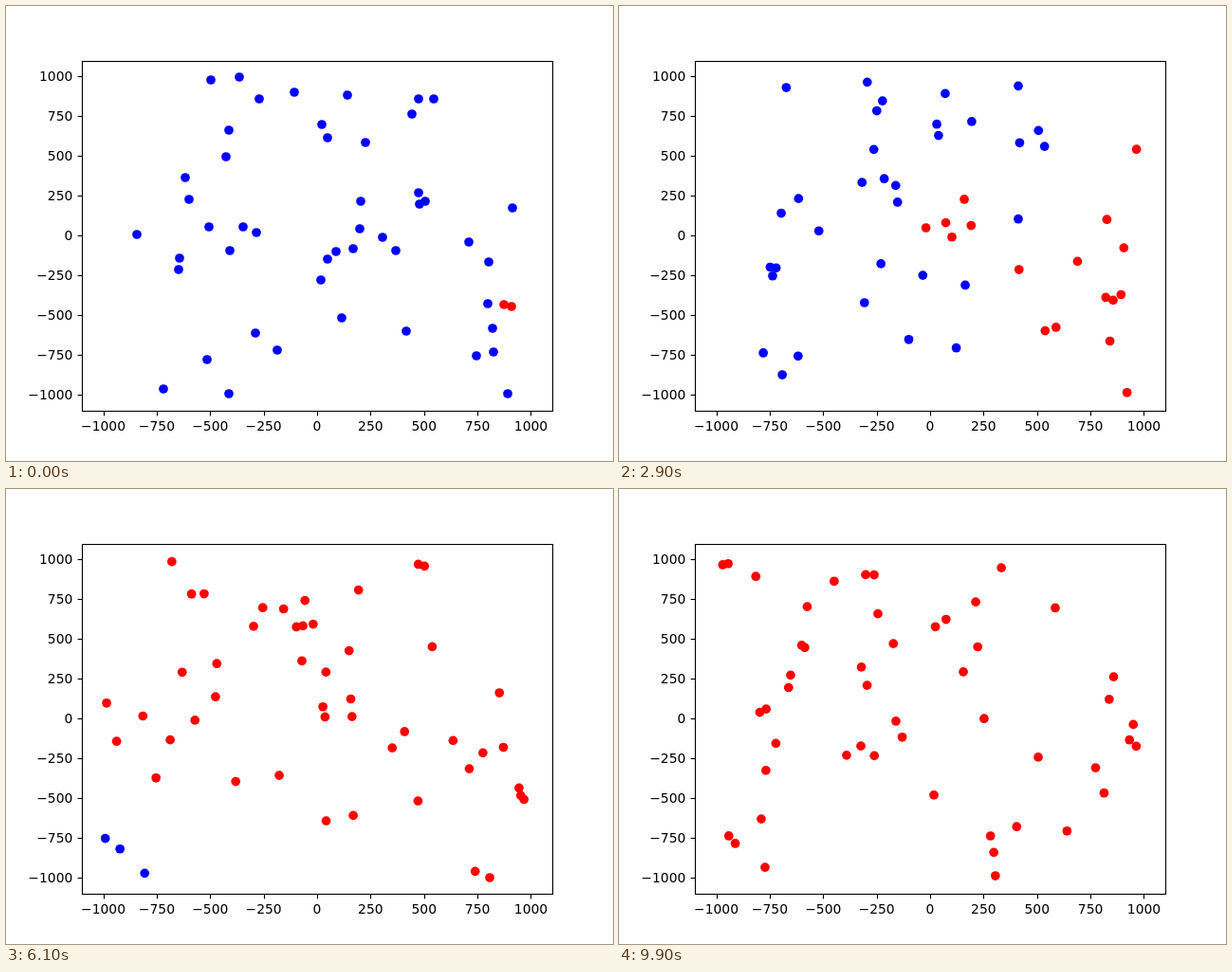
These frames come from a looping animation (640x480 px, 10 s). An HTML page with a canvas:

```html
<!DOCTYPE html>
<html lang="en">
<head>
<meta charset="utf-8">
<title>Spreading dots</title>
<style>
  html, body { margin: 0; width: 100%; height: 100%; overflow: hidden; background: #fff; }
  canvas { display: block; }
</style>
</head>
<body>
<canvas id="plot" width="640" height="480"></canvas>
<script>
const ctx = document.getElementById('plot').getContext('2d');
const STEP = 100, STEPS = 100;
const BOX = { left: 80, right: 576, top: 58, bottom: 427 };
const toX = v => 328 + v * 496 / 2200;
const toY = v => 242.4 - v * 369.6 / 2200;

// Starting places; the last two dots begin red.
const starts = [
  [216, 78], [246, 75], [267, 98], [304, 91], [360, 94], [435, 98], [451, 98],
  [428, 114], [333, 125], [339, 139], [379, 144], [235, 131], [232, 159],
  [189, 181], [193, 204], [138, 241], [214, 233], [250, 233], [264, 239],
  [236, 258], [183, 266], [182, 278], [374, 206], [373, 235], [397, 244],
  [411, 258], [366, 256], [348, 259], [339, 267], [332, 289], [435, 197],
  [436, 209], [442, 206], [534, 213], [488, 249], [509, 270], [508, 314],
  [513, 340], [496, 369], [514, 365], [529, 409], [422, 343], [354, 329],
  [263, 345], [286, 363], [212, 373], [166, 404], [235, 409],
  [525, 315], [533, 317]
];

function makeRandom(seed) {
  return () => {
    seed = (seed * 16807) % 2147483647;
    return seed / 2147483647;
  };
}
const random = makeRandom(290417);
const jitter = size => (random() * 2 - 1) * size;

// Reflects a value back into the range.
function fold(v, lo, hi) {
  if (v < lo) return 2 * lo - v;
  return v > hi ? 2 * hi - v : v;
}

// Random walk; all but the rightmost dots drift slowly up and left.
function makePath([x, y]) {
  const drift = x < 480 ? 0.6 : 0;
  const path = [[x, y]];
  while (path.length < STEPS) {
    x = fold(x + jitter(13) - drift, toX(-1000), toX(1000));
    y = fold(y + jitter(10) - drift / 2, toY(1000), toY(-1000));
    path.push([x, y]);
  }
  return path;
}
const paths = starts.map(makePath);

// Number of red dots: a logistic curve that steepens past its middle.
function redCount(i) {
  const t = i * STEP / 1000 - 3.8;
  const n = Math.round(50.5 / (1 + Math.exp(-t * (t < 0 ? 0.8 : 1.2))));
  return Math.min(starts.length, n);
}

// At each step the blue dots closest to a red one turn red.
function spread() {
  const since = starts.map((s, k) => k >= starts.length - 2 ? 0 : Infinity);
  let reds = 2;
  for (let i = 0; i < STEPS; i++) {
    while (reds < redCount(i)) {
      let best = Infinity, pick = 0;
      paths.forEach((a, p) => {
        if (since[p] <= i) return;
        paths.forEach((b, q) => {
          if (since[q] > i) return;
          const d = Math.hypot(a[i][0] - b[i][0], a[i][1] - b[i][1]);
          if (d < best) { best = d; pick = p; }
        });
      });
      since[pick] = i;
      reds++;
    }
  }
  return since;
}
const redSince = spread();

function line(x1, y1, x2, y2) {
  ctx.beginPath();
  ctx.moveTo(x1, y1);
  ctx.lineTo(x2, y2);
  ctx.stroke();
}

function drawAxes() {
  const { left, right, top, bottom } = BOX;
  ctx.strokeStyle = ctx.fillStyle = '#000';
  ctx.lineWidth = 1.11;
  ctx.font = '13.89px "DejaVu Sans", sans-serif';
  ctx.strokeRect(left + 0.5, top + 0.5, right - left, bottom - top);
  for (let v = -1000; v <= 1000; v += 250) {
    const label = String(v).replace('-', '\u2212');
    const x = Math.round(toX(v)), y = Math.round(toY(v));
    line(x + 0.5, bottom + 0.5, x + 0.5, bottom + 5.4);
    line(left + 0.5, y + 0.5, left - 4.4, y + 0.5);
    ctx.textAlign = 'center';
    ctx.fillText(label, toX(v), 448);
    ctx.textAlign = 'right';
    ctx.fillText(label, 70.3, y + 5);
  }
}

function drawDot([x, y], color) {
  ctx.fillStyle = color;
  ctx.beginPath();
  ctx.arc(x, y, 4.86, 0, Math.PI * 2);
  ctx.fill();
}

function draw(i) {
  ctx.fillStyle = '#fff';
  ctx.fillRect(0, 0, 640, 480);
  paths.forEach((path, k) => drawDot(path[i], redSince[k] <= i ? '#f00' : '#00f'));
  drawAxes();
}

const begin = performance.now();
function tick() {
  const t = Math.max(0, performance.now() - begin);
  draw(Math.floor(t / STEP) % STEPS);
  requestAnimationFrame(tick);
}
draw(0);
requestAnimationFrame(tick);
</script>
</body>
</html>
```
